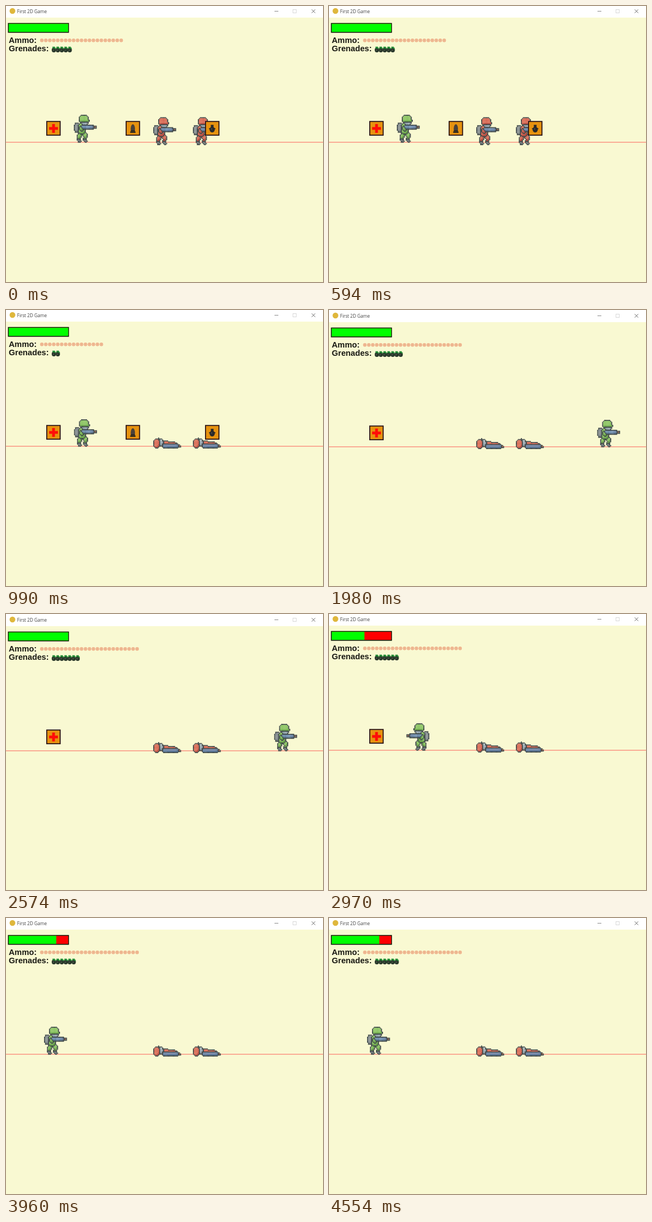
Recreate the animation shown at these times as an HTML page with a canvas. Size 575x500 px, loop 4950 ms.

```html
<!DOCTYPE html>
<html lang="en">
<head>
<meta charset="utf-8">
<title>First 2D Game</title>
<style>
  html, body { margin: 0; width: 100%; height: 100%; overflow: hidden; background: #f9f9d2; }
  canvas { display: block; }
</style>
</head>
<body>
<canvas id="stage" width="575" height="500"></canvas>
<script>
const ctx = document.getElementById('stage').getContext('2d');
const SCENE_MS = 990;
const CELL = 1.8;
const SLOT = 7.2;
const OUTLINE = '#414a4b';

// Each material is a lit tone and a shaded tone.
const GREEN = ['#8ac463', '#65a045'];
const RED = ['#d96a56', '#b9493d'];
const STEEL = ['#7391b5', '#587699'];
const GREY = ['#858d93', '#697278'];
const FACE = ['#a9bac4', '#8a9ca8'];
const MUZZLE = ['#c5633d', '#c5633d'];

const scenes = [
  { ammo: 21, grenades: 5, health: 1, crates: 3, x: 123, bob: 0, alive: true },
  { ammo: 16, grenades: 2, health: 1, crates: 3, x: 123.5, bob: 1 },
  { ammo: 25, grenades: 7, health: 1, crates: 1, x: 486.5, bob: 1, shift: 1 },
  { ammo: 25, grenades: 6, health: 0.55, crates: 1, x: 141, bob: 1, flip: true },
  { ammo: 25, grenades: 6, health: 0.8, crates: 0, x: 69, bob: 0 }
];

function box(color, x, y, w, h) {
  ctx.fillStyle = color;
  ctx.fillRect(x, y, w, h);
}

function disc(color, x, y, rx, ry = rx) {
  ctx.fillStyle = color;
  ctx.beginPath();
  ctx.ellipse(x, y, rx, ry, 0, 0, Math.PI * 2);
  ctx.fill();
}

function text(str, x, y, font, color) {
  ctx.font = font;
  ctx.fillStyle = color;
  ctx.fillText(str, x, y);
}

const ellipse = (cx, cy, rx, ry) => (x, y) => ((x - cx) / rx) ** 2 + ((y - cy) / ry) ** 2 <= 1;

const capsule = (x1, y1, x2, y2, r) => (x, y) => {
  const dx = x2 - x1, dy = y2 - y1;
  const t = ((x - x1) * dx + (y - y1) * dy) / (dx * dx + dy * dy);
  const k = Math.min(1, Math.max(0, t));
  return Math.hypot(x - x1 - k * dx, y - y1 - k * dy) <= r;
};

const join = (...parts) => (x, y) => parts.some(part => part(x, y));

// Rasterises a shape into square cells: dark rim, lit body, shaded underside.
function pixels(inside, [lit, shade]) {
  for (let row = 0; row < 30; row++) {
    for (let col = 0; col < 30; col++) {
      const x = col + 0.5, y = row + 0.5;
      if (!inside(x, y)) continue;
      const core = inside(x - 1, y) && inside(x + 1, y) && inside(x, y - 1) && inside(x, y + 1);
      const color = !core ? OUTLINE : inside(x + 1, y + 2) ? lit : shade;
      box(color, col, row, 1.1, 1.1);
    }
  }
}

function sprite(x, y, flip, paint) {
  ctx.save();
  ctx.translate(flip ? x + 41 : x, y);
  ctx.scale(flip ? -CELL : CELL, CELL);
  paint();
  ctx.restore();
}

function leg(hip, knee, foot, suit) {
  pixels(capsule(foot, 25, foot + 1, 26.5, 1.8), GREY);
  pixels(join(capsule(hip, 18, knee, 21.5, 2.4), capsule(knee, 21.5, foot, 23.5, 1.7)), suit);
}

function soldier(x, y, suit, bob = 0, flip = false) {
  sprite(x, y, flip, () => {
    leg(7, 5.5, 4.8, suit);
    leg(9.5, 12, 11, suit);
    ctx.translate(0, bob / CELL);
    pixels(ellipse(3.3, 13, 3.3, 5.5), GREY);
    pixels(ellipse(8, 14, 4.5, 6), suit);
    pixels(ellipse(11, 8.5, 3.6, 3), FACE);
    pixels(join(ellipse(10, 4, 5.3, 4.2), capsule(6.5, 6, 14.5, 6, 1.5)), suit);
    pixels(capsule(18, 12.5, 21.6, 12.5, 1.6), MUZZLE);
    pixels(capsule(8.5, 13, 18, 12.5, 2.5), STEEL);
    pixels(capsule(6.5, 13, 8, 15, 1.7), suit);
  });
}

function fallen(x, y) {
  sprite(x, y, false, () => {
    pixels(capsule(11, 6, 22, 7.5, 3), RED);
    pixels(capsule(24, 8.8, 26.6, 8.8, 1.5), MUZZLE);
    pixels(capsule(11, 8.6, 24, 8.6, 2.2), STEEL);
    pixels(ellipse(7.8, 5, 2.8, 4), FACE);
    pixels(ellipse(3.6, 6, 3.6, 5), RED);
    box(OUTLINE, 5, 0, 1, 3);
  });
}

const icons = [
  function medkit() {
    box('#ff0d08', 10.7, 5.5, 5, 16);
    box('#ff0d08', 5.2, 11, 16, 5);
  },
  function bullet() {
    disc('#4a4139', 13.1, 14, 3.9, 8);
    box('#e6920f', 9, 18, 8.4, 5);
    box('#29251f', 9.3, 17, 7.6, 2);
    box('#29251f', 8.3, 19, 9.6, 2.5);
  },
  function grenade() {
    disc('#29292a', 13, 15.5, 4.7, 5.3);
    box('#29292a', 10.5, 7, 5, 4);
    box('#29292a', 7.3, 13, 11.4, 2);
    disc('#515047', 12, 14.5, 1.3);
  }
];

function crate(index) {
  ctx.save();
  ctx.translate(73 + index * 144, 208.3);
  box('#2a1316', 0, 0, 26.2, 26.6);
  box('#e6920f', 1.8, 1.8, 22.6, 23);
  icons[index]();
  ctx.restore();
}

function titleBar() {
  box('#fff', 0, -2, 575, 23);
  disc('#dfb73c', 11.7, 9, 5.2);
  text('First 2D Game', 20, 12.6, '8.2px "Open Sans", sans-serif', '#444');
  box('#888', 487, 9, 7, 1);
  ctx.strokeStyle = '#d8d8d8';
  ctx.strokeRect(520.5, 6.5, 6, 6);
  ctx.strokeStyle = '#666';
  ctx.beginPath();
  for (const side of [-1, 1]) {
    ctx.moveTo(557.7 - side * 3.2, 6.3);
    ctx.lineTo(557.7 + side * 3.2, 12.7);
  }
  ctx.stroke();
}

function hud({ ammo, grenades, health }) {
  box('#0b1a08', 3.5, 30.8, 110.7, 17.7);
  box('#ff0000', 5, 32.3, 107.8, 14.6);
  box('#00ff00', 5, 32.3, 107.8 * health, 14.6);

  const font = 'bold 14.7px "Liberation Sans", Arial, sans-serif';
  text('Ammo:', 5, 67, font, '#181812');
  text('Grenades:', 5, 82, font, '#181812');

  for (let i = 0; i < ammo; i++) {
    const x = 65 + i * SLOT;
    disc('#eeb28a', x, 62.2, 3.2);
    disc('#f5cba8', x, 62.2, 1.8);
    disc('#e39f78', x, 62.2, 1);
  }
  for (let i = 0; i < grenades; i++) {
    const x = 86.8 + i * SLOT;
    disc('#2a382b', x, 79.7, 3.9, 4.2);
    box('#228c35', x - 2.5, 73.7, 4.5, 3);
    box('#228c35', x + 1.5, 75.5, 2, 2.5);
    disc('#566050', x - 1, 80, 1);
  }
}

function draw(scene) {
  box('#f9f9d2', 0, 0, 575, 500);
  ctx.save();
  ctx.translate(0, scene.shift || 0);
  titleBar();
  hud(scene);
  box('#fb8c7c', 0, 246.1, 575, 1.4);
  soldier(scene.x, 197, GREEN, scene.bob, scene.flip);
  for (const x of [267, 339]) {
    if (scene.alive) soldier(x, 201.5, RED);
    else fallen(x, 231);
  }
  for (let i = 0; i < scene.crates; i++) crate(i);
  ctx.restore();
}

const start = performance.now();
function tick() {
  const elapsed = performance.now() - start;
  draw(scenes[Math.floor(elapsed / SCENE_MS) % scenes.length]);
  requestAnimationFrame(tick);
}
tick();
</script>
</body>
</html>
```
